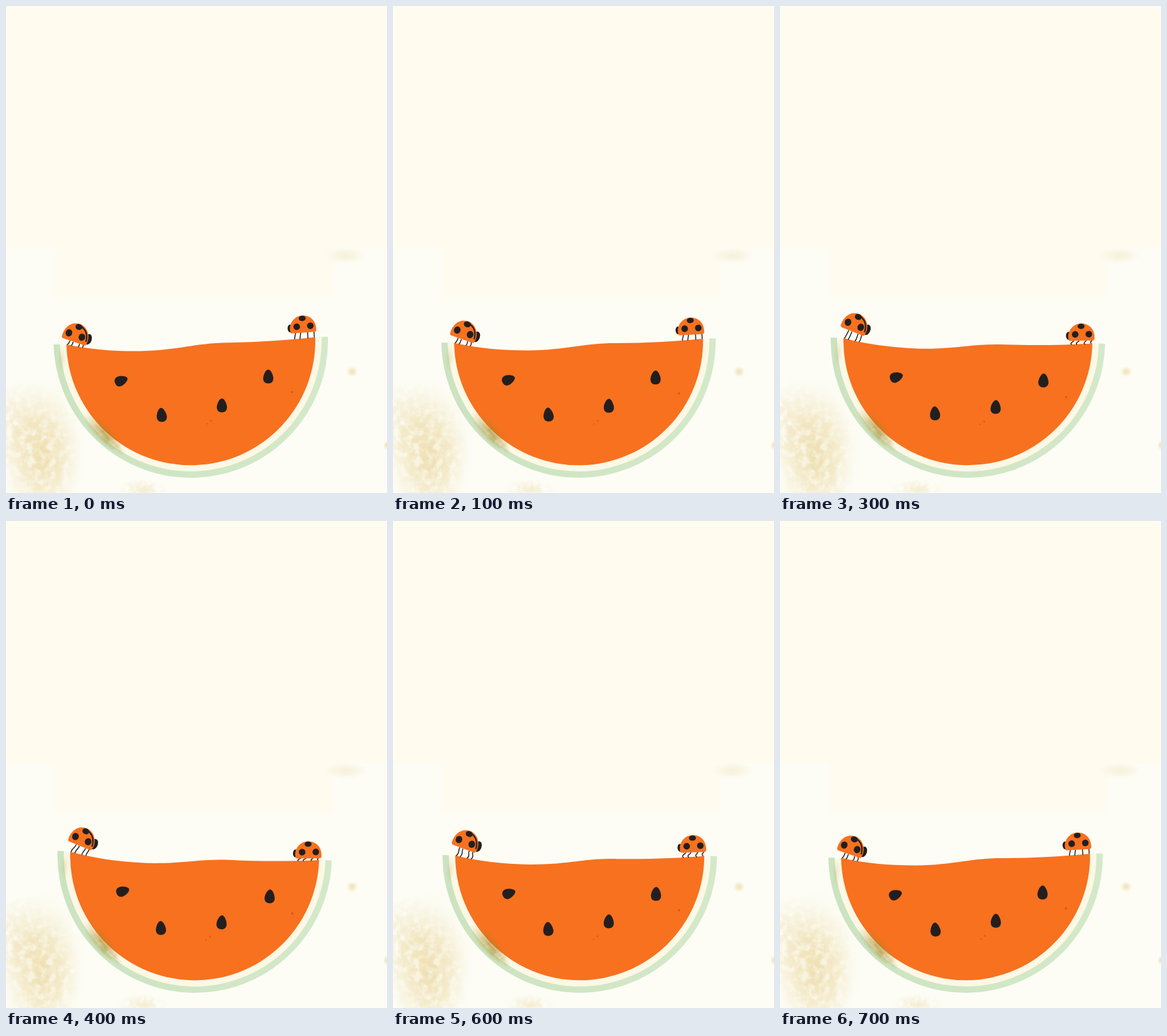
These frames come from a looping animation (600x767 px, 0.8 s). An HTML page:

```html
<!DOCTYPE html>
<html lang="en">
<head>
<meta charset="utf-8">
<title>Melon seesaw</title>
<style>
html, body { margin: 0; height: 100%; overflow: hidden; background: #fffbef; }
svg { display: block; width: 100%; height: 100%; }
</style>
</head>
<body>
<svg viewBox="0 0 600 767">
  <defs>
    <filter id="soft" x="-5%" y="-5%" width="110%" height="110%"><feGaussianBlur stdDeviation="1"/></filter>
    <filter id="mottle" x="0" y="0" width="100%" height="100%" color-interpolation-filters="sRGB">
      <feTurbulence type="fractalNoise" baseFrequency=".09" numOctaves="4" seed="4"/>
      <feColorMatrix values="0 0 0 0 0  0 0 0 0 0  0 0 0 0 0  0 0 0 3 -.8"/>
      <feComposite in="SourceGraphic" operator="in"/>
    </filter>
    <radialGradient id="tan">
      <stop offset="0" stop-color="#e9d59b" stop-opacity=".72"/>
      <stop offset=".5" stop-color="#efdfae" stop-opacity=".5"/>
      <stop offset="1" stop-color="#f6edcc" stop-opacity="0"/>
    </radialGradient>
    <radialGradient id="bruise">
      <stop offset="0" stop-color="#977a12" stop-opacity=".5"/>
      <stop offset="1" stop-color="#a88a20" stop-opacity="0"/>
    </radialGradient>
    <linearGradient id="rind">
      <stop offset="0" stop-color="#cbe3c0"/>
      <stop offset="1" stop-color="#d4e9c9"/>
    </linearGradient>
    <path id="seed" fill="#231f1e" d="M0-11C4-11 8-2 8 3C8 8 5 11 0 11S-8 8-8 3C-8-2-4-11 0-11Z"/>
    <path id="shell" fill="#f7711f" d="M-19 0C-24-11-15-27 0-27C14-27 22-16 21-3Q21 0 17 0Z"/>
    <g id="spots" fill="#231f1e">
      <circle cx="-9.5" cy="-10" r="5.2"/><circle cx="12" cy="-10" r="5.2"/>
      <ellipse cx="0" cy="-22.5" rx="5.5" ry="4.2"/>
    </g>
  </defs>

  <!-- paper -->
  <path fill="#fdfdf6" filter="url(#soft)" d="M-9 381H78V458H515V381H609V776H-9Z"/>
  <g fill="url(#tan)">
    <g filter="url(#mottle)">
      <ellipse cx="58" cy="708" rx="62" ry="105"/>
      <ellipse cx="15" cy="660" rx="70" ry="75" opacity=".55"/>
      <ellipse cx="215" cy="762" rx="42" ry="18" opacity=".6"/>
    </g>
    <ellipse cx="55" cy="700" rx="75" ry="125" opacity=".4"/>
    <ellipse cx="545" cy="576" rx="10" ry="9"/>
    <ellipse cx="599" cy="692" rx="5" ry="8"/>
    <ellipse cx="535" cy="393" rx="35" ry="14" opacity=".45"/>
  </g>

  <g id="melon">
    <path fill="#fcf8e5" d="M84 533A207 207 0 0 0 498 521H487A196 196 0 0 1 95 533Z"/>
    <path fill="url(#rind)" d="M75 533A216 216 0 0 0 507 521H497A206 206 0 0 1 85 533Z"/>
    <path fill="#f7711f" d="M95 533C132 541 170 544 212 543.5C275 542 295 531 350 530.3C400 529.5 445 526 487 521.5A196 196 0 0 1 95 533Z"/>
    <g fill="url(#bruise)">
      <ellipse cx="153" cy="672" rx="42" ry="15" transform="rotate(46 153 672)"/>
      <ellipse cx="160" cy="681" rx="38" ry="10" transform="rotate(44 160 681)" filter="url(#mottle)"/>
      <ellipse cx="88" cy="557" rx="7" ry="22" opacity=".3"/>
    </g>
    <g fill="#b5520f" opacity=".6">
      <circle cx="450" cy="608" r="1.8"/><circle cx="323" cy="653" r="1.3"/><circle cx="317" cy="658" r="1"/>
    </g>
    <use href="#seed" transform="translate(181.5 590) rotate(68) scale(1 .95)"/>
    <use href="#seed" transform="translate(245 644) rotate(-6)"/>
    <use href="#seed" transform="translate(340 629)"/>
    <use href="#seed" transform="translate(413 583.5)"/>

    <path id="legsL" fill="none" stroke="#231f1e" stroke-width="1.5"/>
    <g id="bugL">
      <g transform="translate(107 529) rotate(18.5)">
        <ellipse cx="20" cy="-11" rx="5.5" ry="8.5" fill="#231f1e"/>
        <use href="#shell" transform="scale(-1 1.1)"/>
        <path d="M2-27Q17-23 18-6" fill="none" stroke="#231f1e" stroke-width="2.2"/>
        <use href="#spots" transform="scale(-1 1.1)"/>
      </g>
    </g>
    <path id="legsR" fill="none" stroke="#231f1e" stroke-width="1.5"/>
    <g id="bugR">
      <g transform="translate(468 514.5) rotate(-4)">
        <ellipse cx="-20" cy="-8" rx="4" ry="6.2" fill="#231f1e"/>
        <use href="#shell"/><use href="#spots"/>
      </g>
    </g>
  </g>
</svg>
<script>
const $ = id => document.getElementById(id);
const tilt = [0, .73, 1.82, 2.9, 3.6];

// Per pose: dx, dy of the body and how far the legs bow.
const bugs = [
  { side: 'L', dx: [0, .6, 1, 1.8, 2.6], dy: [0, -1.9, -7, -7, -6], bow: [1.5, 2, 3, 1.5, 0],
    tops: [[101, 527], [106, 529], [116, 532], [122, 533]],
    feet: [[96.5, 533.5], [102.5, 535], [113.5, 537], [120, 538]] },
  { side: 'R', dx: [0, 0, 1, 1.3, 1.7], dy: [0, 1, 1.7, 3.5, 5.6], bow: [0, 0, -3, -2.5, -2],
    tops: [[456, 514], [464, 514], [475, 513], [485, 511]],
    feet: [[454.5, 525], [463, 524.5], [475.5, 523.5], [485.5, 521.5]] }
];

function pose(p) {
  $('melon').setAttribute('transform', `rotate(${tilt[p]} 293 625)`);
  for (const b of bugs) {
    const dx = b.dx[p], dy = b.dy[p], w = b.bow[p];
    $('bug' + b.side).setAttribute('transform', `translate(${dx} ${dy})`);
    $('legs' + b.side).setAttribute('d', b.tops.map(([x, y], i) => {
      const [fx, fy] = b.feet[i], tx = x + dx, ty = y + dy, h = fy - ty;
      return `M${tx} ${ty}C${tx - w} ${ty + h / 3} ${fx + 2 * w} ${ty + h * .6} ${fx} ${fy}`;
    }).join(''));
  }
}

function draw(now) {
  const step = Math.floor(now / 100) % 8;
  pose(step < 5 ? step : 8 - step);
  requestAnimationFrame(draw);
}
draw(performance.now());
</script>
</body>
</html>
```
